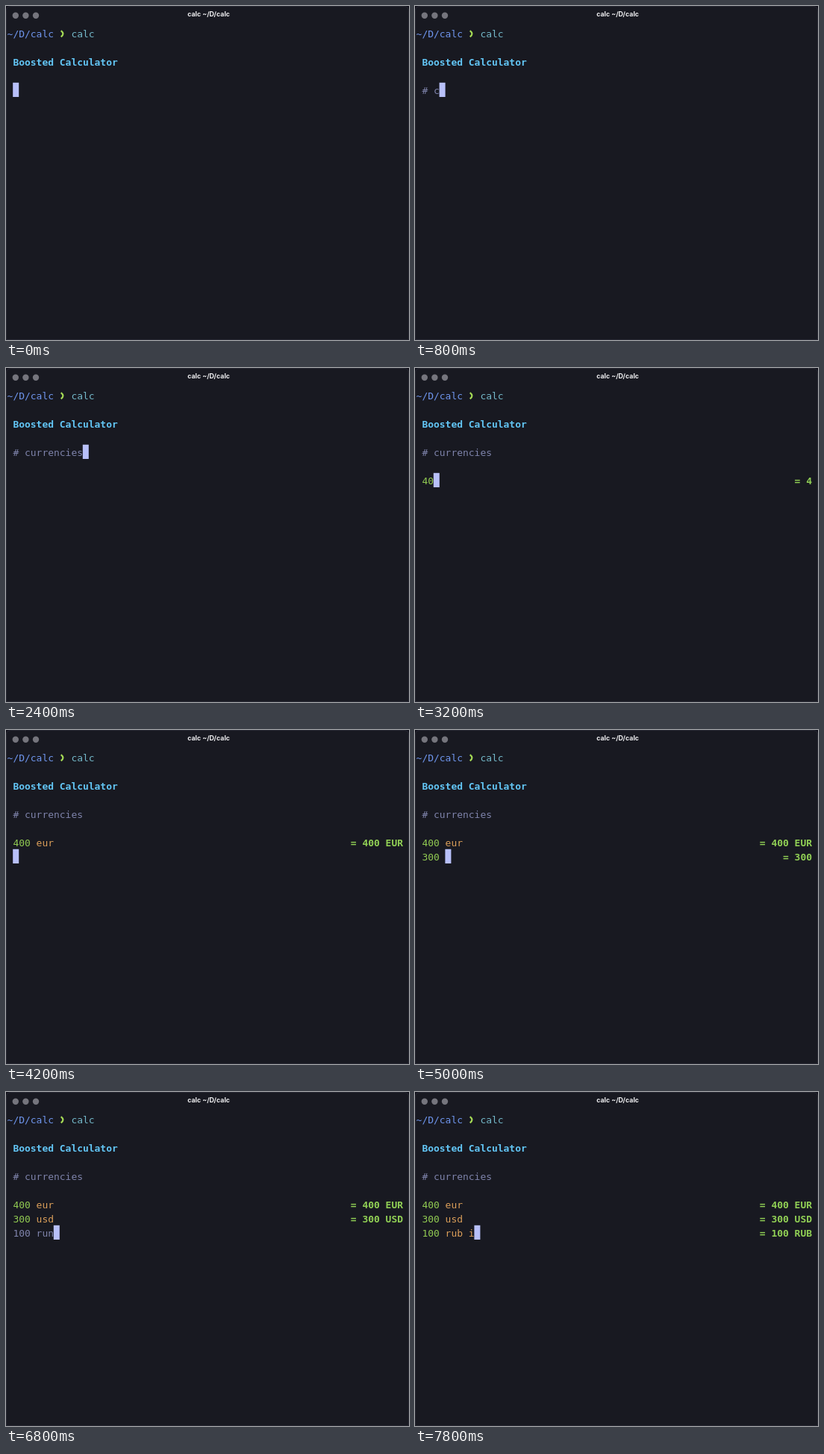
These frames come from a looping animation (540x448 px, 8 s). An HTML page:

```html
<!DOCTYPE html>
<html lang="en">
<head>
<meta charset="utf-8">
<title>calc</title>
<style>
  html, body { margin: 0; width: 100%; height: 100%; overflow: hidden; background: #10101a; }
  svg { display: block; width: 540px; height: 448px; }
  text { font: 12.96px "DejaVu Sans Mono", monospace; white-space: pre; }
  .bold { font-weight: bold; }
  .title { font: 700 8.8px Inter, sans-serif; fill: #f0f0f2; text-anchor: middle; }
  .path { fill: #6f96ee; }
  .command { fill: #74b9ca; }
  .heading { fill: #63c7f7; }
  .muted { fill: #7f84ac; }
  .number { fill: #91ca52; }
  .unit { fill: #dda05a; }
  .result { fill: #91d055; font-weight: bold; text-anchor: end; }
</style>
</head>
<body>
<svg viewBox="0 0 540 448">
  <path d="M.5 447.5V6.5q0-6 6-6h527q6 0 6 6v441z" fill="#181921" stroke="#262732"/>
  <g fill="#75757d">
    <circle cx="12.8" cy="12.8" r="4.2"/>
    <circle cx="26.4" cy="12.8" r="4.2"/>
    <circle cx="40" cy="12.8" r="4.2"/>
  </g>
  <text class="title" x="271.6" y="14.3">calc ~/D/calc</text>
  <text class="path" x="1.6" y="41.6">~/D/calc</text>
  <path d="M73.7 33.2q2.7 2.1 2.7 4.1t-2.7 4.1" fill="none" stroke="#a5da55" stroke-width="2.2"/>
  <text class="command" x="87.4" y="41.6">calc</text>
  <text class="heading bold" x="9.4" y="79.6">Boosted Calculator</text>
  <g id="lines"></g>
  <rect id="cursor" width="8" height="19.2" fill="#b8c0fa"/>
</svg>
<script>
const LOOP = 8000, LEFT = 9.4, CELL = 7.8, TOP = 27, ROW = 19;

// [time, row, typed text, result]; text without a result is muted
const events = [
  [0, 4, ''], [400, 4, '#'], [600, 4, '# '], [800, 4, '# c'], [1000, 4, '# cu'],
  [1200, 4, '# curr'], [1400, 4, '# curre'], [1600, 4, '# curren'],
  [1800, 4, '# currenc'], [2000, 4, '# currenci'], [2200, 4, '# currencies'],
  [2600, 5, ''], [2800, 6, ''],
  [3000, 6, '4', ''], [3200, 6, '40', '4'], [3400, 6, '400', '40'],
  [3600, 6, '400 ', '400'], [3800, 6, '400 eu'], [4000, 6, '400 eur', '400 EUR'],
  [4200, 7, ''], [4400, 7, '3', ''], [4600, 7, '30', '3'], [4800, 7, '300', '30'],
  [5000, 7, '300 ', '300'], [5200, 7, '300 u'], [5400, 7, '300 us'],
  [5600, 7, '300 usd', '300 USD'],
  [6000, 8, ''], [6200, 8, '10', '1'], [6400, 8, '100 ', '100'],
  [6600, 8, '100 ru'], [6800, 8, '100 run'], [7000, 8, '100 ru'],
  [7200, 8, '100 rub'], [7400, 8, '100 rub', '100 RUB'],
  [7600, 8, '100 rub ', '100 RUB'], [7800, 8, '100 rub i', '100 RUB']
];

const lines = document.getElementById('lines');
const cursor = document.getElementById('cursor');
let shown = -1;

function lineMarkup([, row, text, result]) {
  const y = TOP + ROW * row + 14.6;
  const [, number, unit] = text.match(/^(\d*)(.*)$/);
  const content = result === undefined
    ? `<tspan class="muted">${text}</tspan>`
    : `<tspan class="number">${number}</tspan><tspan class="unit">${unit}</tspan>`;
  const output = result ? `<text class="result" x="532" y="${y}">= ${result}</text>` : '';
  return `<text x="${LEFT}" y="${y}">${content}</text>${output}`;
}

function show(index) {
  const latest = new Map(events.slice(0, index + 1).map(event => [event[1], event]));
  lines.innerHTML = [...latest.values()].map(lineMarkup).join('');
  const [, row, text] = events[index];
  cursor.setAttribute('x', LEFT + CELL * text.length - 0.2);
  cursor.setAttribute('y', TOP + ROW * row - 0.2);
}

function frame() {
  const time = performance.now() % LOOP;
  const index = events.findLastIndex(event => event[0] <= time);
  if (index !== shown) show(shown = index);
  requestAnimationFrame(frame);
}
frame();
</script>
</body>
</html>
```
